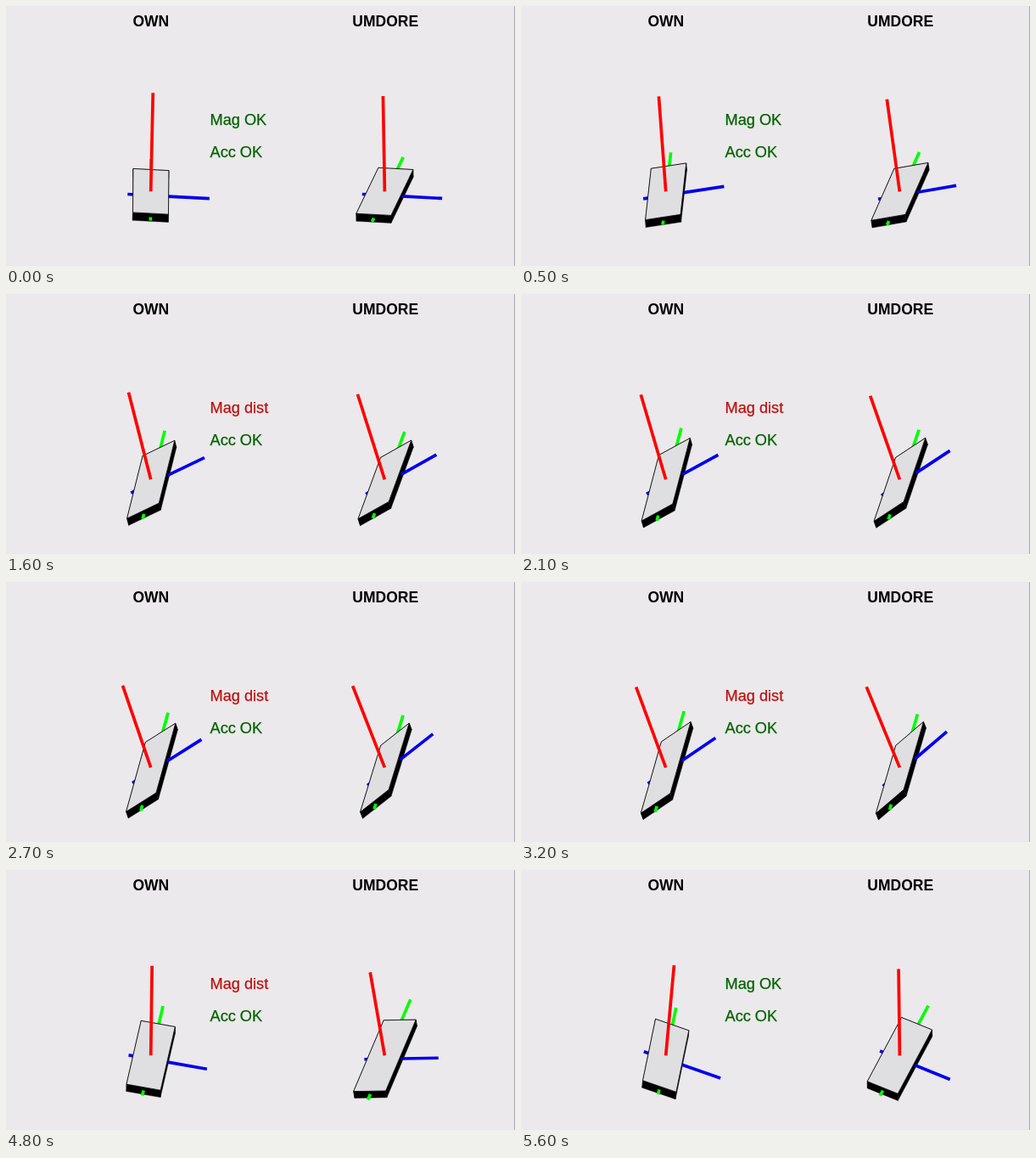
Animation, 600 px wide and 306 px high, one loop 5700 ms. Source, as an HTML page:

```html
<!DOCTYPE html>
<html lang="en">
<head>
<meta charset="utf-8">
<title>Orientation comparison</title>
<style>
  html, body { margin: 0; width: 100%; height: 100%; overflow: hidden; background: #ebe9eb; }
  svg { display: block; width: 600px; height: 306px; font: 18.2px "Liberation Sans", Arial, sans-serif; }
  .title { font-weight: bold; font-size: 17.5px; text-anchor: middle; }
  .ok { fill: #006000; stroke: #006000; stroke-width: .25; }
  .bad { fill: #bc1010; stroke: #bc1010; stroke-width: .25; }
  .axis { stroke-width: 3.7; }
  .side { stroke: #000; stroke-width: .4; }
  .top { fill: #dfdee0; stroke: #000; stroke-width: .8; }
</style>
</head>
<body>
<svg viewBox="0 0 600 306">
  <path d="M599.5 0V306" stroke="#aaa8aa"/>
  <text class="title" x="170.8" y="24.2">OWN</text>
  <text class="title" x="447.2" y="24.2">UMDORE</text>
  <text id="mag" x="240.5" y="140"></text>
  <text class="ok" x="240.5" y="178.3">Acc OK</text>
  <g id="own"></g>
  <g id="other"></g>
</svg>
<script>
const LOOP = 5700, STEP = 100;
const THICK = 0.08;     // body thickness relative to the red axis
const RED = '#f00', GREEN = '#0f0', BLUE = '#00e';

// Each pose is roll (degrees), pitch (length of the green axis), yaw (degrees)
const peak = { own: [-34, 73, 16], other: [-40.5, 69.5, 16.3] };
const keys = [
  { t: 0, own: [3, 43, 0.5], other: [3, 50, 25.8] },
  { t: 1100, own: [-22.6, 60, 13.4], other: [-25.2, 62.4, 21.6] },
  { t: 3000, ...peak },
  { t: 3600, ...peak },
  { t: 4200, own: [-16.7, 68.8, 14.6], other: [-23.1, 73.8, 19.1] },
  { t: 4800, own: [10, 64, 13], other: [-1, 76, 23] },
  { t: 5600, own: [19, 61.7, 11.7], other: [22, 71.3, 28.2] }
];
const centers = { own: [170.7, 218.3], other: [446.4, 218.4] };

function pose(id, t) {
  const i = Math.max(1, keys.findIndex(k => k.t >= t));
  const a = keys[i - 1], b = keys[i], u = (t - a.t) / (b.t - a.t);
  return a[id].map((v, c) => v + (b[id][c] - v) * u);
}

const add = (p, v, k = 1) => [p[0] + v[0] * k, p[1] + v[1] * k];
const polar = (len, deg) => {
  const a = deg * Math.PI / 180;
  return [len * Math.cos(a), len * Math.sin(a)];
};
const path = pts => 'M' + pts.map(p => p.map(n => n.toFixed(2)).join(' ')).join('L');
const line = (a, b, color) => `<path class="axis" stroke="${color}" d="${path([a, b])}"/>`;
const face = (pts, type) => `<path class="${type}" d="${path(pts)}Z"/>`;

function drawPhone(id, t) {
  const center = centers[id];
  const [roll, pitch, yaw] = pose(id, t);
  const rise = pitch - 43, skew = yaw * rise / 80;

  const red = polar(116 - rise / 2, 0.42 * roll - skew - 90);
  const blue = polar(69.3 - 0.7 * skew + roll * roll / 300, roll);
  const green = polar(pitch, yaw - 90);

  // The body spans x/2 and y either way from its middle
  const mid = add(center, red, -THICK / 2);
  const x = blue.map(n => n / 1.65), y = green.map(n => n / 1.67);
  const top = [[-1, 1], [1, 1], [1, -1], [-1, -1]]
    .map(([a, b]) => add(add(center, x, a / 2), y, b));
  const low = top.map(p => add(p, red, -THICK));
  const sides = top.map((p, i) => {
    const j = (i + 1) % 4;
    return face([p, top[j], low[j], low[i]], 'side');
  });

  document.getElementById(id).innerHTML =
    line(mid, add(mid, x, -0.65), BLUE) +
    line(mid, add(mid, green), GREEN) +
    sides.join('') +
    face(top, 'top') +
    line(add(mid, x, 0.5), add(mid, blue), BLUE) +
    line(add(mid, y, -0.99), add(mid, y, -1.15), GREEN) +
    line(center, add(center, red), RED);
}

const mag = document.getElementById('mag');
const start = performance.now();

function frame() {
  const t = Math.floor((performance.now() - start) % LOOP / STEP) * STEP;
  const disturbed = t >= 1600 && t < 5200;
  mag.textContent = disturbed ? 'Mag dist' : 'Mag OK';
  mag.setAttribute('class', disturbed ? 'bad' : 'ok');
  drawPhone('own', t);
  drawPhone('other', t);
  requestAnimationFrame(frame);
}
frame();
</script>
</body>
</html>
```
